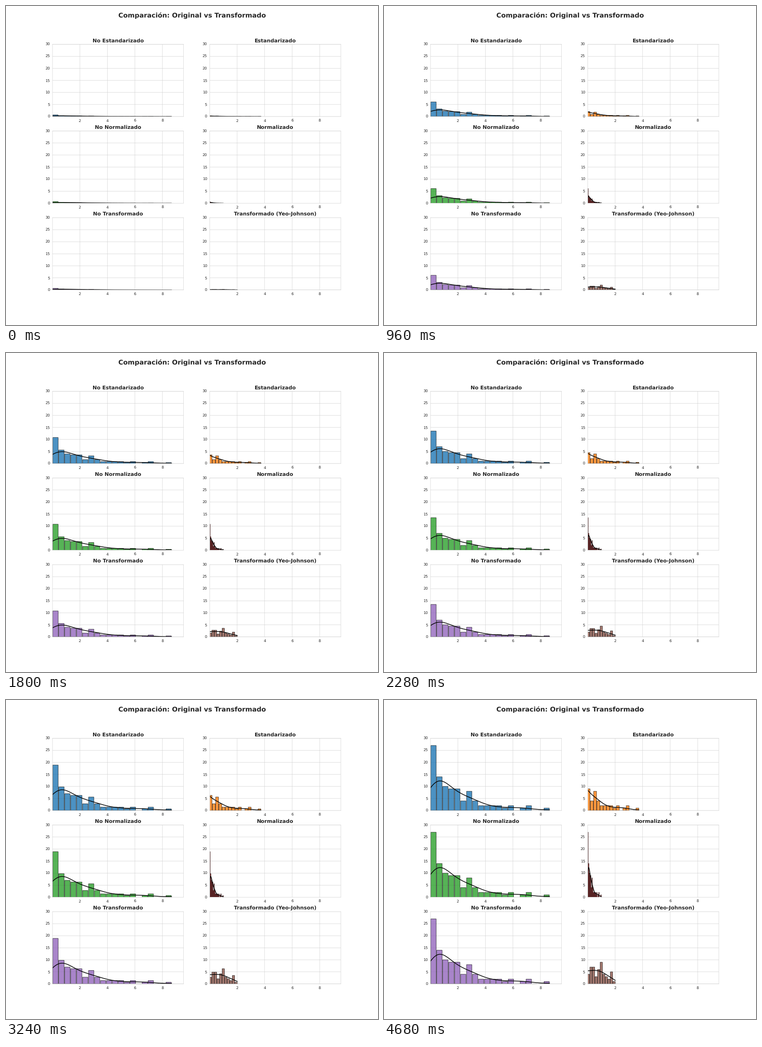
A matplotlib script that plays this animation: 808x693 px, repeating every 4800 ms.

```python
import numpy as np
import matplotlib.pyplot as plt
from matplotlib.animation import FuncAnimation

W, H, DPI = 808, 693, 64
K = 57.75 / DPI  # type and line scale for a 12 inch tall layout
STEPS, INTERVAL = 40, 120
BINS = 20

plt.rcParams.update({
    "font.family": "DejaVu Sans",
    "font.size": 10 * K,
    "text.color": ".15",
    "text.hinting": "none",
    "path.snap": False,
    "axes.edgecolor": ".8",
    "axes.linewidth": 0.8 * K,
    "axes.grid": True,
    "axes.axisbelow": True,
    "axes.titlepad": 6 * K,
    "grid.color": ".8",
    "grid.linewidth": 0.8 * K,
    "lines.solid_capstyle": "round",
})
for axis in ("xtick", "ytick"):
    plt.rcParams.update({
        f"{axis}.color": ".15",
        f"{axis}.major.size": 0,
        f"{axis}.major.pad": 7 * K,
    })


def standardize(x):
    return (x - x.mean()) / x.std()


def normalize(x):
    return (x - x.min()) / (x.max() - x.min())


def yeo_johnson(x):
    """Maximum likelihood power transform of non-negative data."""
    logs = np.log1p(x)

    def power(lam):
        return np.expm1(lam * logs) / lam

    lams = np.linspace(-1.5, 0.5, 20000)[:, None]
    score = (-len(x) / 2 * np.log(power(lams).var(axis=1))
             + (lams[:, 0] - 1) * logs.sum())
    return standardize(power(lams[score.argmax(), 0]))


def kde(x, grid):
    bw = x.std(ddof=1) * len(x) ** -0.2
    z = (grid[:, None] - x) / bw
    return np.exp(-z ** 2 / 2).sum(axis=1) / (len(x) * bw * np.sqrt(2 * np.pi))


class Panel:
    def __init__(self, ax, x, title, color):
        self.counts, edges = np.histogram(x, bins=BINS)
        step = edges[1] - edges[0]
        grid = np.linspace(x.min(), x.max(), 200)
        self.curve = kde(x, grid) * len(x) * step
        self.bars = ax.bar((edges[:-1] + edges[1:]) / 2, np.zeros(BINS),
                           width=0.9 * step, color=color, alpha=0.8,
                           edgecolor="black", linewidth=K)
        self.line, = ax.plot(grid, 0 * grid, color="black", lw=1.8 * K)
        ax.set_title(title, fontsize=14 * K, fontweight="bold")
        ax.set_xlim(data.min(), data.max() * 1.1)
        ax.set_ylim(0, 30)
        ax.set_xticks([2, 4, 6, 8])
        ax.set_yticks(range(0, 31, 5))

    def grow(self, part):
        for bar, count in zip(self.bars, self.counts):
            bar.set_height(count * part)
        self.line.set_ydata(self.curve * part)


np.random.seed(42)
data = np.random.exponential(scale=2, size=100)

fig, axes = plt.subplots(3, 2, figsize=(W / DPI, H / DPI), dpi=DPI)
fig.subplots_adjust(left=0.125, right=0.9, bottom=0.11, top=0.88,
                    wspace=0.2, hspace=0.2)
fig.suptitle("Comparación: Original vs Transformado",
             fontsize=18 * K, fontweight="bold")

specs = [
    (data, "No Estandarizado", "tab:blue"),
    (standardize(data), "Estandarizado", "tab:orange"),
    (data, "No Normalizado", "tab:green"),
    (normalize(data), "Normalizado", "tab:red"),
    (data, "No Transformado", "tab:purple"),
    (yeo_johnson(data), "Transformado (Yeo-Johnson)", "tab:brown"),
]
panels = [Panel(ax, *spec) for ax, spec in zip(axes.flat, specs)]


def update(i):
    for panel in panels:
        panel.grow((i + 1) / STEPS)


anim = FuncAnimation(fig, update, frames=STEPS, interval=INTERVAL,
                     repeat=True, repeat_delay=0)
plt.show()
```
